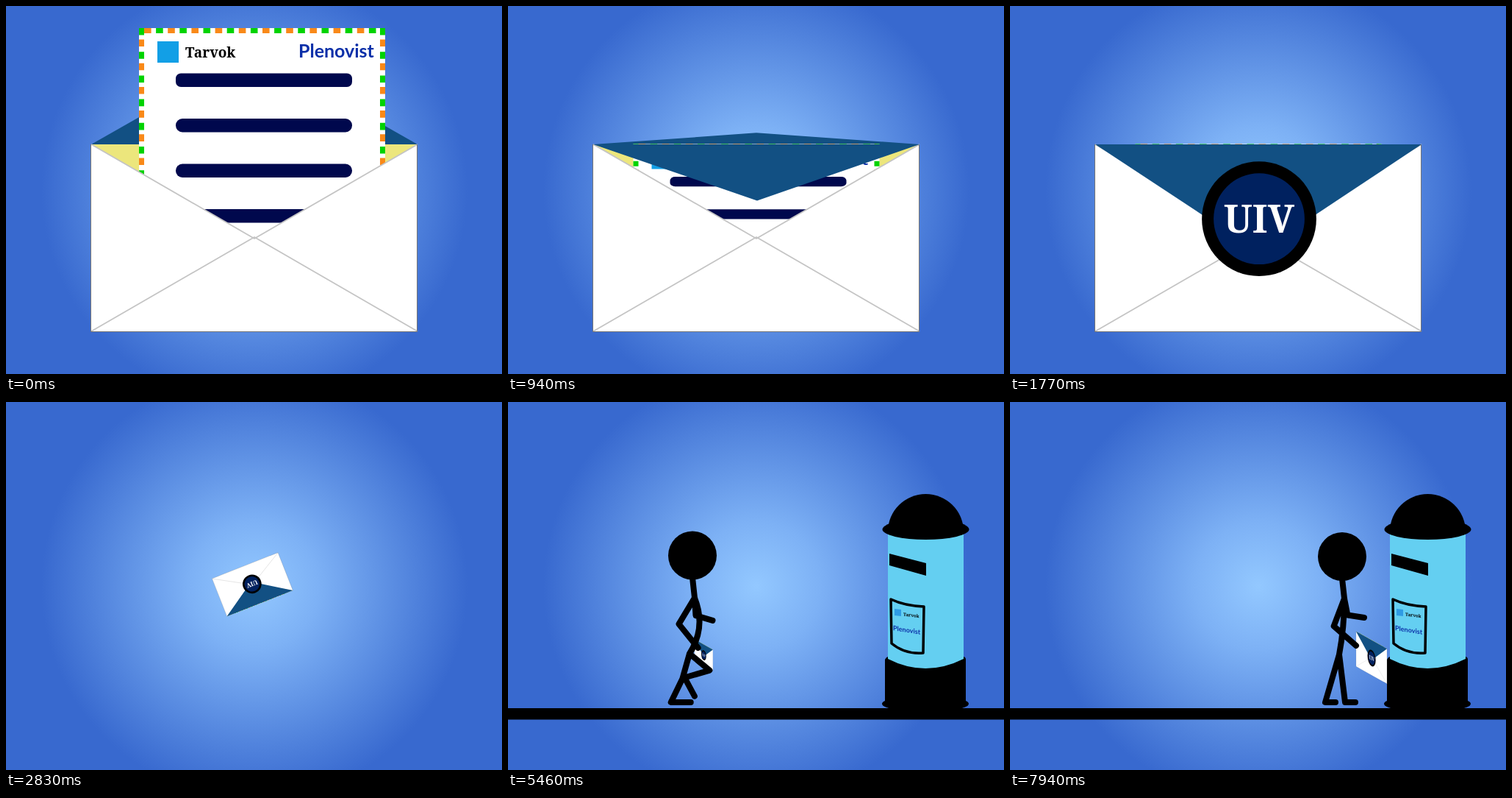
These frames come from a looping animation (675 by 500 pixels, 8 s). An HTML page:

```html
<!DOCTYPE html>
<html lang="en">
<head>
<meta charset="utf-8">
<title>Letter on its way</title>
<style>
  html, body { margin: 0; width: 100%; height: 100%; overflow: hidden; background: #3869cf; }
  svg { display: block; width: 100vw; height: 100vh; }
  .serif { font-family: "Noto Serif", "DejaVu Serif", serif; font-weight: 700; }
  .sans { font-family: Lato, "Open Sans", sans-serif; font-weight: 700; fill: #0b2fa8; }
  .limb { fill: none; stroke: #000; stroke-width: 8; stroke-linecap: round; stroke-linejoin: round; }
  .dash { fill: none; stroke-width: 7; stroke-dasharray: 9.6 22.6; }
</style>
</head>
<body>
<svg viewBox="0 0 675 500">
  <defs>
    <radialGradient id="glow" gradientUnits="userSpaceOnUse" cx="338" cy="250" r="290">
      <stop offset="0" stop-color="#93c8ff"/>
      <stop offset=".3" stop-color="#7db1f5"/>
      <stop offset="1" stop-color="#3869cf"/>
    </radialGradient>

    <g id="env">
      <path id="flapBack" fill="#125083"/>
      <path d="M116 188H560L338 316Z" fill="#ece67c"/>
      <g id="sheet">
        <path d="M181 30H516V383H181Z" fill="#fff"/>
        <g class="dash">
          <path d="M188 33.500H512M184.500 45.500V383M512.500 45.500V383" stroke="#f98918"/>
          <path d="M204.100 33.500H512M184.500 30V383M512.500 30V383" stroke="#00d300"/>
        </g>
        <rect x="206" y="48" width="29" height="29" fill="#129fe6"/>
        <text class="serif" x="244" y="70" font-size="19">Tarvok</text>
        <text class="sans" x="398" y="70" font-size="25">Plenovist</text>
        <g id="bars" fill="#00084d"></g>
      </g>
      <path d="M116 188L338 316 560 188V442H116Z" fill="#fff"/>
      <path d="M116 188L338 316 560 188M116 442L338 314 560 442" fill="none" stroke="#c4c4c4" stroke-width="1.800"/>
      <path d="M115.500 188V442.500H559.500V188" fill="none" stroke="#777"/>
      <path id="flapFront" fill="#125083"/>
      <g id="seal">
        <circle r="78"/>
        <circle r="62" fill="#00215f"/>
        <text class="serif" y="19" font-size="52" text-anchor="middle" fill="#fff">UIV</text>
      </g>
    </g>
  </defs>

  <rect width="675" height="500" fill="url(#glow)"/>
  <use id="flying" href="#env"/>

  <g id="street">
    <path d="M0 416H675V431.500H0Z"/>
    <path d="M513 350Q515 346 518 346H619Q623 346 623 350V410H513Z"/>
    <ellipse cx="568" cy="410" rx="59" ry="11"/>
    <path d="M517 173V349Q568 375 620 349V173Z" fill="#64cff1"/>
    <path d="M517 176A51.500 51 0 0 1 620 176Z"/>
    <ellipse cx="568.500" cy="173" rx="59" ry="14"/>
    <path d="M519 206L569 219V236L519 222Z"/>
    <path d="M521 268Q540 277 566 278L565 341Q540 343 522 328Z" fill="none" stroke="#000" stroke-width="3.500" stroke-linejoin="round"/>
    <g transform="translate(526 281) skewY(7)">
      <rect width="9" height="9" fill="#2f9be4"/>
      <text class="serif" x="12" y="8" font-size="6">Tarvok</text>
    </g>
    <text class="sans" transform="translate(524 310) skewY(9)" font-size="9">Plenovist</text>
    <use id="held" href="#env"/>
    <path id="body" class="limb"/>
    <circle id="head" r="33"/>
  </g>
</svg>

<script>
const $ = id => document.getElementById(id);
const set = (id, name, value) => $(id).setAttribute(name, value);
const show = (id, on) => set(id, "display", on ? "inline" : "none");
const clamp = v => Math.min(1, Math.max(0, v));
const lerp = (a, b, p) => a + (b - a) * p;
const mix = (a, b, p) => a.map((v, i) => lerp(v, b[i], p));
const { PI, cos, sin, sqrt, hypot } = Math;

// Linear track through [time, ...values] keys, held at both ends
function track(t, keys) {
  let i = 0;
  while (i < keys.length - 2 && t > keys[i + 1][0]) i++;
  const [a, b] = [keys[i], keys[i + 1]];
  return mix(a, b, clamp((t - a[0]) / (b[0] - a[0]))).slice(1);
}

$("bars").innerHTML = [0, 1, 2, 3].map(i =>
  `<rect x="231" y="${91.5 + i * 61.5}" width="240" height="18.5" rx="${i ? 9 : 7}"/>`).join("");

// Point beside the middle of a-b; bulge(length) is positive towards the front
function joint(a, b, bulge) {
  const [dx, dy] = [b[0] - a[0], b[1] - a[1]];
  const d = hypot(dx, dy), h = bulge(d) / d;
  return [(a[0] + b[0]) / 2 + dy * h, (a[1] + b[1]) / 2 - dx * h];
}

function stepAt(t) {
  if (t < 5840) return Math.min(9, Math.floor((t - 3640) / 200));
  return t >= 7940 ? 21 : Math.min(20, 10 + Math.floor((t - 5840) / 200));
}

// One stride lasts ten steps; rest fades the stride into standing
function drawWalker(step) {
  const [x] = track(step, [[0, 57.5], [9, 251], [19, 452]]);
  const phase = 2 * PI * (step - 1) / 10;
  const rest = clamp((step - 19) / 2);
  const bob = 14 * cos(2 * phase + 0.22 * PI) * (1 - rest);
  const headY = 212 + bob - 2 * rest;
  const shoulder = [3, 267 + 0.25 * bob];
  const hip = [-4, 343 + 0.3 * bob];
  const belly = [lerp(19, 3, rest), 306];

  const arm = hand => [shoulder, joint(shoulder, hand, d => -0.35 * d), hand];
  const c = cos(phase - 0.12 * PI);
  const hand = mix([4 - 57 * c, 335 + 14 * c - 28 * c * c], [19, 331], rest);
  const f = cos(phase + 0.07 * PI);
  const freeHand = mix([2 + 50 * f, 305 - 16 * f], [30, 293], rest);

  const bone = lerp(35.5, 32.5, rest);
  function leg(p, standX) {
    const lift = 42 * sqrt(Math.max(0, -sin(p + 0.18 * PI))) * (1 - rest);
    const ankle = [lerp(-20 + 30 * cos(p), standX, rest), 408 - lift];
    const toe = [ankle[0] + lerp(27, 14, rest) - 0.4 * lift, 408 - 0.25 * lift];
    const knee = joint(hip, ankle, d => sqrt(Math.max(0, bone * bone - d * d / 4)));
    return [hip, knee, ankle, toe];
  }

  const limbs = [arm(hand), arm(freeHand), leg(phase, 4), leg(phase + PI, -23)];
  set("body", "d", `M0 ${headY + 30}L${shoulder}Q${belly} ${hip}` +
    limbs.map(points => "M" + points.join("L")).join(""));
  set("body", "transform", `translate(${x} 0)`);
  set("head", "transform", `translate(${x} ${headY})`);
  holdLetter(x + hand[0], hand[1], lerp(25, 42, rest));
}

function holdLetter(x, y, w) {
  const a = w / 444, skew = a * 0.56, d = w * 1.13 / 254;
  const left = x - (42 - w) * 0.28, top = y - w * 0.46;
  set("held", "transform",
    `matrix(${a} ${skew} 0 ${d} ${left} ${top}) translate(-116 -188)`);
}

function drawEnvelope(t) {
  const [dx, top, s] = track(t, [[240, 0, 30, 1], [560, -6, 123, 1], [760, -10.5, 187.6, 0.721]]);
  set("sheet", "transform", `translate(${dx} ${top - 30 * s}) scale(1 ${s})`);
  const [up] = track(t, [[560, 62], [995, 188]]);
  const [down] = track(t, [[560, 188], [1290, 334.5]]);
  set("flapBack", "d", `M116 188L338 ${up} 560 188Z`);
  set("flapFront", "d", `M116 188L339 ${down} 560 188Z`);
  const [y, size] = track(t, [[1290, 199, 270], [1930, 319, 118]]);
  show("seal", t >= 1290);
  set("seal", "transform", `translate(339 ${y}) scale(${size / 156})`);
}

function drawFlight(t) {
  const [x, y] = track(t, [[2250, 338, 315], [2340, 338, 338], [2830, 334.5, 248], [3310, 752, 272]]);
  const turn = -360 * clamp((t - 2260) / 1020);
  const scale = lerp(0.217, 1, (1 - clamp((t - 2260) / 400)) ** 3);
  set("flying", "transform",
    `translate(${x} ${y}) rotate(${turn}) scale(${scale}) translate(-338 -315)`);
}

const start = performance.now();
function draw() {
  const t = (performance.now() - start) % 8000;
  const walking = t >= 3640;
  show("flying", t < 3310);
  show("street", walking);
  drawEnvelope(t);
  drawFlight(t);
  if (walking) drawWalker(stepAt(t));
  requestAnimationFrame(draw);
}
draw();
</script>
</body>
</html>
```
